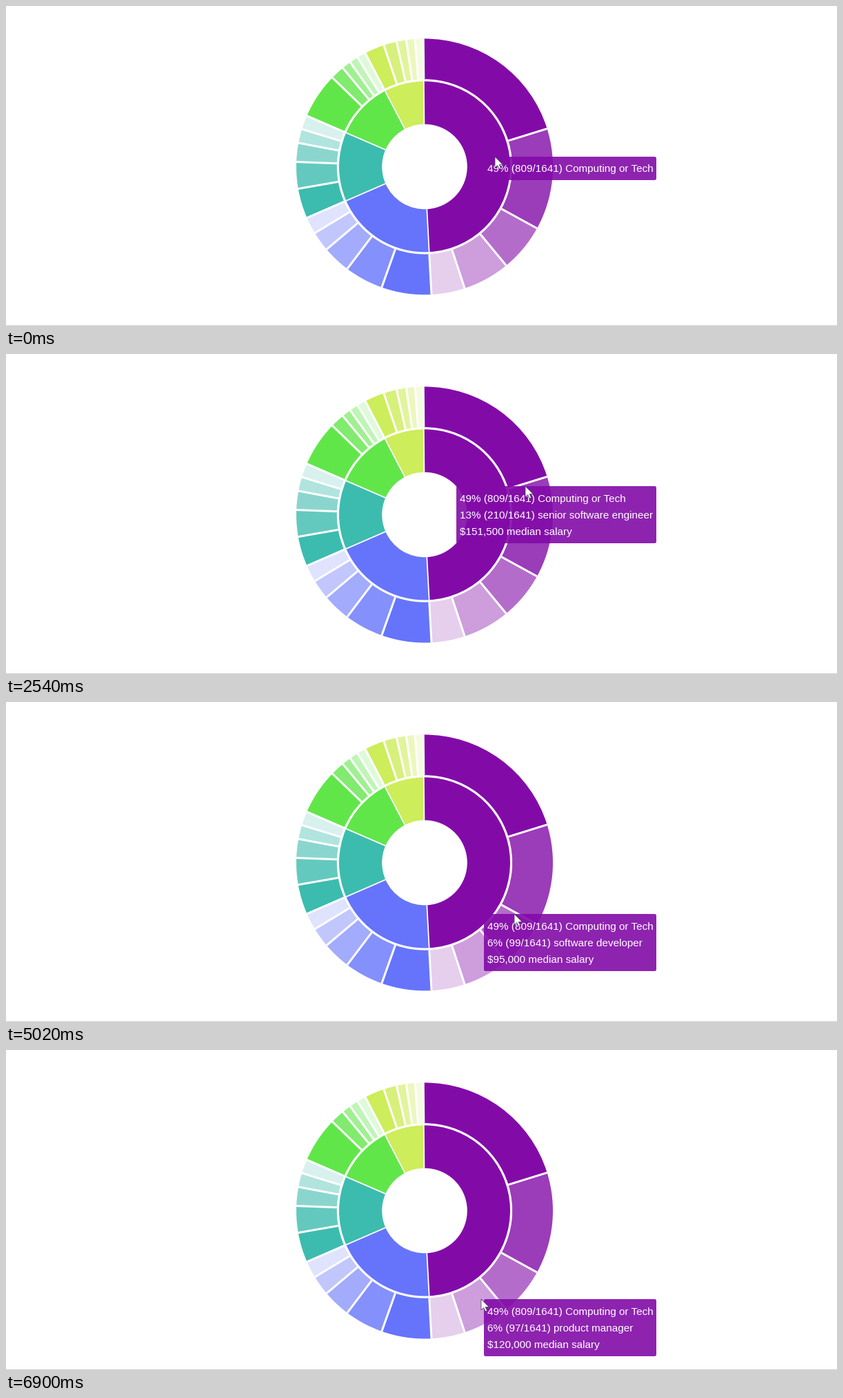
A matplotlib script for the animation above (8000 ms loop, 1205 by 465 pixels).

```python
import matplotlib.pyplot as plt
import numpy as np
from matplotlib.animation import FuncAnimation
from matplotlib.patches import FancyBboxPatch, Polygon, Rectangle, Wedge

W, H, DPI = 1205, 465, 64
PT = 72 / DPI                      # points per pixel
LOOP, STEP = 8000, 40
CENTER = np.array([607, 233.5])
INNER, OUTER = (61.8, 124), (127.2, 186)
ROTATION = -0.55                   # degrees
PURPLE = "#820ba8"

# People per job in each field
FIELDS = {
    PURPLE: [334, 210, 99, 97, 69],
    "#6574fa": [103, 80, 58, 41, 35],
    "#3cbcae": [62, 55, 39, 29, 29],
    "#61e64a": [94, 29, 19, 18, 18],
    "#cded5a": [41, 27, 20, 18, 17],
}
TOTAL = sum(map(sum, FIELDS.values()))
TECH = FIELDS[PURPLE]
JOBS = [("software engineer", 125000), ("senior software engineer", 151500),
        ("software developer", 95000), ("product manager", 120000)]

# Pointer moves: start, end, points passed at even intervals
MOVES = [
    (490, 1520, [(709, 219), (706, 196), (698, 176), (733, 157), (733, 154)]),
    (1990, 3010, [(732, 154), (744, 175), (759, 202), (761, 214)]),
    (4210, 5280, [(766, 188), (769, 288), (738, 307), (734, 315)]),
    (6060, 6900, [(730, 320), (716, 258), (700, 350), (689, 362)]),
]
TICK = 78
ARROW = np.array([(0, 0), (0, 16), (3.7, 12.6), (6.2, 18), (8.6, 17),
                  (6.3, 11.6), (11.4, 11.4)])
RIGHT_LIMIT, LINE_HEIGHT, PADDING = 943, 24.5, 4.75

fig = plt.figure(figsize=(W / DPI, H / DPI), dpi=DPI, facecolor="white")
ax = fig.add_axes([0, 0, 1, 1])
ax.set(xlim=(0, W), ylim=(H, 0))
ax.axis("off")


def degrees(count):
    return 360 * count / TOTAL + ROTATION


def ring_slice(first, last, radii, color, gap, alpha=1):
    start, end = degrees(first), degrees(last)
    ax.add_patch(Wedge(CENTER, radii[1], start - 90, end - 90,
                       width=radii[1] - radii[0], facecolor=color,
                       alpha=alpha, linewidth=0))
    a = np.radians(end)
    edge = CENTER + np.outer(radii, (np.sin(a), -np.cos(a)))
    ax.plot(*edge.T, color="white", linewidth=gap * PT,
            solid_capstyle="butt", zorder=2)


def draw_chart():
    start = 0
    for color, counts in FIELDS.items():
        ring_slice(start, start + sum(counts), INNER, color, 1.8)
        for i, count in enumerate(counts):
            ring_slice(start, start + count, OUTER, color, 3, 1 - 0.2 * i)
            start += count
    ax.add_patch(Rectangle((0, 464), W, 1, facecolor="#cccccc", linewidth=0))


draw_chart()
box = FancyBboxPatch((0, 0), 1, 1, boxstyle="round,pad=0,rounding_size=2.5",
                     facecolor=PURPLE, alpha=0.9, linewidth=0, zorder=3)
ax.add_patch(box)
lines = [ax.text(0, 0, "", color="white", family="Liberation Sans",
                 size=15.2 * PT, va="baseline", zorder=4) for _ in range(3)]
pointer = Polygon(ARROW, facecolor="white", edgecolor="#4a4458",
                  linewidth=0.8 * PT, zorder=5)
ax.add_patch(pointer)


def pointer_at(t):
    """Whole-pixel pointer position, refreshed once per tick."""
    started = [move for move in MOVES if move[0] <= t] or MOVES[:1]
    start, end, points = started[-1]
    ticks = round((end - start) / TICK)
    progress = np.clip(np.floor((t - start) / (end - start) * ticks) / ticks, 0, 1)
    knots = np.linspace(0, 1, len(points))
    return [round(np.interp(progress, knots, axis)) for axis in zip(*points)]


def share(count, label):
    return f"{100 * count / TOTAL:.0f}% ({count}/{TOTAL}) {label}"


def tooltip_for(x, y):
    heading = share(sum(TECH), "Computing or Tech")
    dx, dy = x - CENTER[0], y - CENTER[1]
    if np.hypot(dx, dy) < OUTER[0]:
        return [heading], 250
    angle = np.degrees(np.arctan2(dx, -dy)) % 360
    i = np.searchsorted(degrees(np.cumsum(TECH[:3])), angle)
    job, salary = JOBS[i]
    rows = [heading, share(TECH[i], job), f"${salary:,} median salary"]
    return rows, 290 if len(rows[1]) > 35 else 250


def update(n):
    x, y = pointer_at((n + 1) * STEP - 1)
    rows, width = tooltip_for(x, y)
    left = min(x + 5, RIGHT_LIMIT - width)
    box.set_bounds(left, y, width, len(rows) * LINE_HEIGHT + 2 * PADDING)
    for i, line in enumerate(lines):
        line.set_text(rows[i] if i < len(rows) else "")
        line.set_position((left + 5, y + 22.5 + i * LINE_HEIGHT))
    pointer.set_xy(ARROW + (x, y))
    return [box, pointer, *lines]


anim = FuncAnimation(fig, update, frames=LOOP // STEP, interval=STEP,
                     repeat=True, repeat_delay=0)
plt.show()
```
